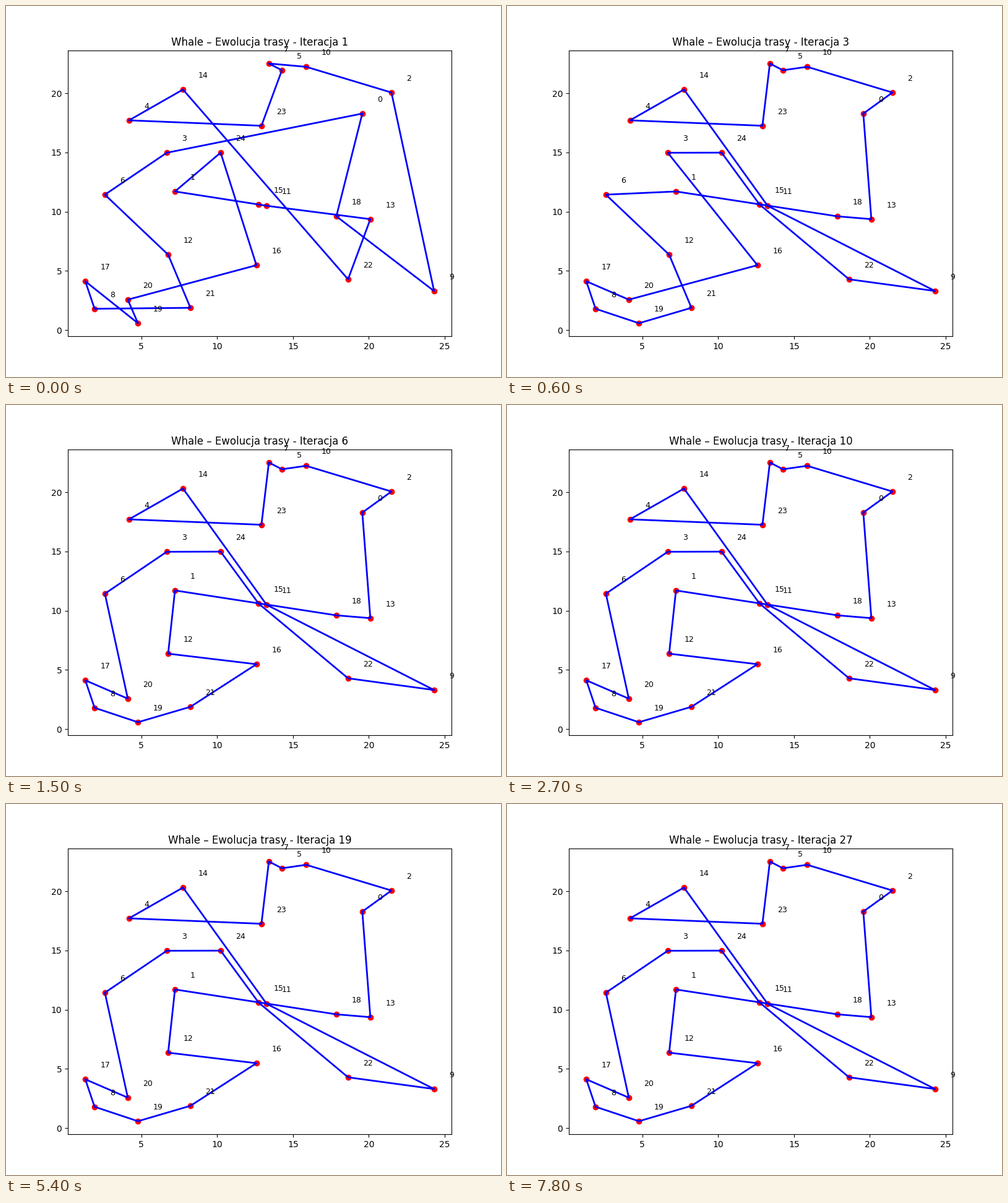
Recreate the animation shown at these times as a matplotlib script. Size 800 by 600 pixels, loop 8000 ms.

```python
import matplotlib.pyplot as plt
from matplotlib.animation import FuncAnimation

INTERVAL = 100            # ms per frame
FRAMES = 80
FRAMES_PER_ITERATION = 3

# Numbered cities, listed in the order of the best tour
CITIES = {
    0: (19.57, 18.29), 2: (21.49, 20.07), 10: (15.87, 22.24), 5: (14.27, 21.95),
    7: (13.41, 22.52), 23: (12.92, 17.26), 4: (4.19, 17.72), 14: (7.75, 20.32),
    11: (13.26, 10.50), 9: (24.30, 3.30), 22: (18.63, 4.29), 15: (12.73, 10.61),
    24: (10.23, 14.99), 3: (6.68, 14.98), 6: (2.60, 11.44), 20: (4.11, 2.57),
    17: (1.31, 4.12), 8: (1.92, 1.80), 19: (4.78, 0.58), 21: (8.24, 1.88),
    16: (12.59, 5.48), 12: (6.77, 6.37), 1: (7.22, 11.71), 18: (17.86, 9.61),
    13: (20.10, 9.37),
}


def relocate(tour, moves):
    """Move each city to the place right after another one."""
    tour = list(tour)
    for city, after in moves.items():
        tour.remove(city)
        tour.insert(tour.index(after) + 1, city)
    return tour


# Worse tours are the better ones with some cities out of place
best = list(CITIES)
middle = relocate(best, {6: 12, 16: 3})
first = relocate(middle, {18: 0, 9: 18, 5: 7, 22: 14, 13: 22, 1: 15, 19: 20, 3: 6})


def tour_at(iteration):
    if iteration == 1:
        return first
    return middle if iteration < 5 else best


def closed_path(tour):
    return zip(*(CITIES[city] for city in tour + tour[:1]))


fig, ax = plt.subplots(figsize=(8, 6), dpi=100)
ax.scatter(*zip(*CITIES.values()), c="red")
route, = ax.plot(*closed_path(best), "b-", linewidth=2)
for number, (x, y) in CITIES.items():
    ax.text(x + 1, y + 1, str(number), fontsize=9)
title = ax.set_title("")


def update(frame):
    iteration = frame // FRAMES_PER_ITERATION + 1
    route.set_data(*closed_path(tour_at(iteration)))
    title.set_text(f"Whale – Ewolucja trasy - Iteracja {iteration}")
    return route, title


animation = FuncAnimation(fig, update, frames=FRAMES, interval=INTERVAL,
                          repeat=True, repeat_delay=0)
plt.show()
```
